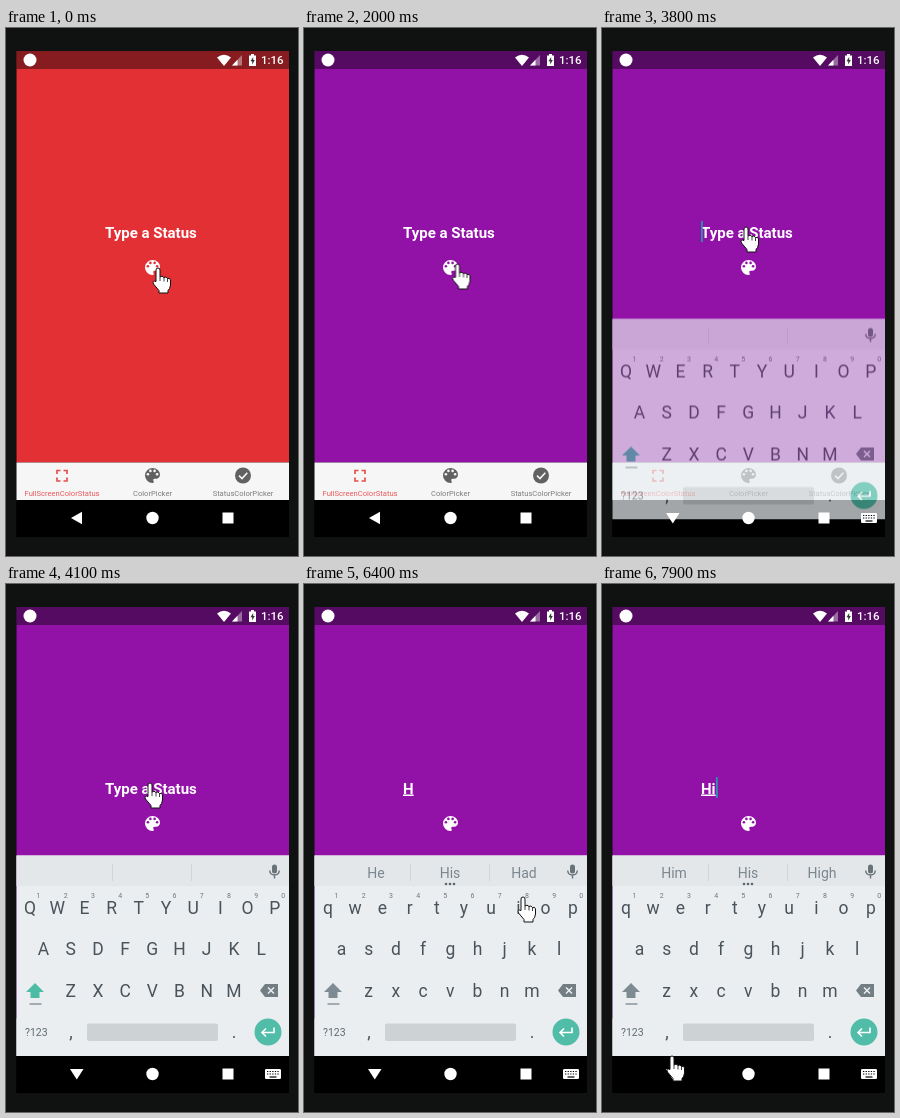
An HTML page for the animation above (8 s loop, 292x528 px).

```html
<!DOCTYPE html>
<html lang="en">
<head>
<meta charset="utf-8">
<title>Colour status</title>
<style>
  html, body { margin: 0; width: 100%; height: 100%; overflow: hidden; background: #101211; }
  svg { display: block; width: 292px; height: 528px; font-family: Roboto, sans-serif; }
  .mid { text-anchor: middle; }
  .status { font-size: 15px; font-weight: 700; fill: #fff; }
  .composing { text-decoration: underline; }
  .label { font-size: 7.6px; fill: #7d7d7d; }
  .key { font-size: 17.5px; fill: #4a535a; }
  .digit { font-size: 7px; fill: #6d777d; }
  .hint { font-size: 14px; fill: #7b868d; }

  .anim { animation: 8s step-end infinite; }
  #screen { animation-name: screen; }
  #cursor { animation-name: cursor; }
  #caret { animation-name: caret; }
  #keyboard { animation-name: keyboard; }
  .closed { animation-name: closed; }
  .open { animation-name: open; }
  .empty { animation-name: empty; }
  .typed { animation-name: typed; }
  .one { animation-name: one; }
  .two { animation-name: two; }
  .hints-one { animation-name: hints-one; }
  .hints-two { animation-name: hints-two; }
  .dots { animation-name: dots; }

  @keyframes screen {
    0% { fill: #e33035; } 12.5% { fill: #d80062; } 23.75%, 100% { fill: #9212a8; }
  }
  @keyframes keyboard {
    0% { opacity: 0; transform: translateY(30px); }
    46.25% { opacity: .35; transform: translateY(30px); }
    47.5% { opacity: .7; transform: translateY(19.5px); }
    48.75% { opacity: .92; transform: translateY(6px); }
    50%, 100% { opacity: 1; transform: none; }
  }
  @keyframes cursor {
    0% { transform: translate(152px, 240px); }
    1.25% { transform: translate(153.5px, 236px); }
    31.25% { transform: translate(148px, 233px); }
    32.5% { transform: translate(139px, 226px); }
    33.75% { transform: translate(133px, 216px); }
    35% { transform: translate(144px, 199px); }
    57.5% { transform: translate(145px, 208px); }
    58.75% { transform: translate(150px, 240px); }
    60% { transform: translate(160px, 290px); }
    61.25% { transform: translate(173px, 340px); }
    62.5% { transform: translate(179px, 358px); }
    77.5% { transform: translate(191px, 346px); }
    78.75% { transform: translate(209px, 325px); }
    80% { transform: translate(219px, 313px); }
    95% { transform: translate(207px, 335px); }
    96.25% { transform: translate(165px, 390px); }
    97.5% { transform: translate(110px, 443px); }
    98.75%, 100% { transform: translate(70px, 472px); }
  }
  @keyframes caret {
    0% { opacity: 0; transform: translateX(99px); }
    43.75%, 56.25% { opacity: 1; transform: translateX(99px); }
    50%, 62.5% { opacity: 0; transform: translateX(99px); }
    68.75%, 83.75% { opacity: 1; transform: translateX(110.5px); }
    77.5% { opacity: 0; transform: translateX(110.5px); }
    86.25%, 98.75%, 100% { opacity: 1; transform: translateX(114px); }
    92.5% { opacity: 0; transform: translateX(114px); }
  }
  @keyframes closed { 0% { opacity: 1; } 46.25%, 100% { opacity: 0; } }
  @keyframes open { 0% { opacity: 0; } 46.25%, 100% { opacity: 1; } }
  @keyframes empty { 0% { opacity: 1; } 68.75%, 100% { opacity: 0; } }
  @keyframes typed { 0% { opacity: 0; } 68.75%, 100% { opacity: 1; } }
  @keyframes one { 0% { opacity: 0; } 68.75% { opacity: 1; } 86.25%, 100% { opacity: 0; } }
  @keyframes two { 0% { opacity: 0; } 86.25%, 100% { opacity: 1; } }
  @keyframes hints-one { 0% { opacity: 0; } 70% { opacity: 1; } 87.5%, 100% { opacity: 0; } }
  @keyframes hints-two { 0% { opacity: 0; } 87.5%, 100% { opacity: 1; } }
  @keyframes dots { 0% { opacity: 0; } 70%, 100% { opacity: 1; } }
</style>
</head>
<body>
<svg viewBox="0 0 292 528">
  <defs>
    <mask id="holes" maskUnits="userSpaceOnUse" x="-9" y="-9" width="18" height="18">
      <rect x="-9" y="-9" width="18" height="18" fill="#fff"/>
      <circle cx="-4.6" cy="-1.2" r="1.3"/><circle cx="-2.1" cy="-4.6" r="1.3"/>
      <circle cx="2.1" cy="-4.6" r="1.3"/><circle cx="4.6" cy="-1.2" r="1.3"/>
    </mask>
    <path id="palette" mask="url(#holes)" d="M0-7.5A7.5 7.5 0 0 0 0 7.5C1.2 7.5 1.7 6.2 1 5.4C.2 4.3 1 3.3 2 3.3H3.5C6 3.3 7.5 1.4 7.5-.8C7.5-4.5 4.2-7.5 0-7.5Z"/>
    <path id="shift" d="M0-8L9 1H4.500V7H-4.500V1H-9Z"/>
  </defs>

  <rect width="292" height="528" fill="#101211"/>
  <path d="M10.500 509V23H283V509" fill="#000"/>
  <rect id="screen" class="anim" x="10.500" y="23" width="272.500" height="411.500"/>

  <!-- status bar -->
  <rect x="10.500" y="23" width="272.500" height="18" fill="#000" opacity=".41"/>
  <g fill="#fff">
    <circle cx="24" cy="32" r="6.500"/>
    <path d="M211 29.500Q218 24 225 29.500L218 38Z"/>
    <path d="M226 37.500L236 27V37.500Z" opacity=".4"/>
    <path d="M226 37.500L231.500 31.700V37.500Z"/>
    <path d="M243 27.500H245V26H248V27.500H250V38H243Z"/>
    <text x="255" y="36" font-size="11.500" font-weight="500">1:16</text>
  </g>
  <path d="M247.200 29L244.500 33.300H246.200V36.500L248.800 32H247.200Z" fill="#333"/>

  <!-- status input -->
  <text class="status anim empty" x="99" y="209.500">Type a Status</text>
  <text class="status composing anim one" x="99" y="209.500">H</text>
  <text class="status composing anim two" x="99" y="209.500">Hi</text>
  <rect id="caret" class="anim" y="193" width="1.800" height="21" fill="#2b8fae"/>
  <use href="#palette" x="146.500" y="239.500" fill="#fff"/>

  <!-- tabs -->
  <rect x="10.500" y="434.500" width="272.500" height="37.500" fill="#f6f6f6"/>
  <path d="M51 446V442.500H54.500M57.500 442.500H61V446M61 449.500V453H57.500M54.500 453H51V449.500" fill="none" stroke="#e5504f" stroke-width="1.700"/>
  <use href="#palette" x="146.500" y="447.500" fill="#616161"/>
  <circle cx="237" cy="447.500" r="8" fill="#616161"/>
  <path d="M233 447.700L236 450.500L241.300 444.700" fill="none" stroke="#f6f6f6" stroke-width="1.600"/>
  <g class="mid">
    <text class="label" x="56" y="468" style="fill:#e9575a">FullScreenColorStatus</text>
    <text class="label" x="146.500" y="468">ColorPicker</text>
    <text class="label" x="237" y="468">StatusColorPicker</text>
  </g>
  <rect x="10.500" y="472" width="272.500" height="37" fill="#000"/>

  <g id="keyboard" class="anim">
    <rect x="10.500" y="271.500" width="272.500" height="200.500" fill="#eaeef1"/>
    <rect x="10.500" y="271.500" width="272.500" height="30.500" fill="#e3e7ea"/>
    <path d="M106.500 280V297M185.500 280V297" stroke="#d0d5d9"/>
    <g fill="none" stroke="#69747a" stroke-width="1.400">
      <rect x="266.700" y="281.200" width="3.600" height="7.600" rx="1.800" fill="#69747a"/>
      <path d="M263.700 286.500Q264 291 268.500 291T273.300 286.500M268.500 291V294.500"/>
    </g>
    <g class="hint mid">
      <g class="anim hints-one" id="hintsOne"></g>
      <g class="anim hints-two" id="hintsTwo"></g>
    </g>
    <g class="anim dots" fill="#5c666c">
      <circle cx="142" cy="300" r="1.300"/><circle cx="146" cy="300" r="1.300"/><circle cx="150" cy="300" r="1.300"/>
    </g>

    <g id="digits" class="digit mid"></g>
    <g id="upper" class="key mid anim empty"></g>
    <g id="lower" class="key mid anim typed"></g>

    <use href="#shift" x="29" y="407" class="anim empty" fill="#4dbca5"/>
    <use href="#shift" x="29" y="407" class="anim typed" fill="#7f8b93"/>
    <path d="M23.500 420H35.500" stroke="#8b969c" stroke-width="1.500"/>
    <path d="M254 406.500L259 400H272V413H259Z" fill="#737e84"/>
    <path d="M262 403.500L268 409.500M268 403.500L262 409.500" stroke="#eaeef1" stroke-width="1.500"/>

    <text x="19" y="452" font-size="10.500" fill="#5f6a70">?123</text>
    <text class="key mid" x="65" y="454">,</text>
    <rect x="81" y="439.500" width="131" height="17.500" rx="2" fill="#cdd2d5"/>
    <text class="key mid" x="228" y="454">.</text>
    <circle cx="262" cy="448" r="13.500" fill="#51bda8"/>
    <path d="M268 443.500V448.500H256.500M260 444.500L256 448.500L260 452.500" fill="none" stroke="#fff" stroke-width="1.600"/>
  </g>

  <!-- navigation -->
  <g fill="#fff">
    <path class="anim closed" d="M65 490L76 483.800V496.200Z"/>
    <path class="anim open" d="M64 485H77.500L70.800 495.500Z"/>
    <circle cx="146.500" cy="490" r="6.200"/>
    <rect x="216.500" y="484.500" width="11" height="11"/>
    <g class="anim open">
      <rect x="259" y="485" width="16" height="10" rx="1.200"/>
      <path d="M261 487.500H273M261 490H273" stroke="#000" stroke-width="1.200" stroke-dasharray="1.300 1.300"/>
      <path d="M263.500 493H270.500" stroke="#000" stroke-width="1.200"/>
    </g>
  </g>

  <g id="cursor" class="anim" stroke="#111" stroke-linejoin="round">
    <path d="M-2 2Q-2 0 0 0T2 2V9Q4 7 6 9.500Q8 8 9.500 10.500Q12 9.500 12.500 12V17Q12 21 10 22.500V25H1V22.500L-4.500 16Q-6 12-2 13.500Z" fill="#fff"/>
    <path d="M2 9V13M6 9.500V13.500M9.500 10.500V14" fill="none" stroke-width=".8"/>
  </g>
</svg>
<script>
  const STEP = 27.2;
  const rows = [["qwertyuiop", 24, 329.5], ["asdfghjkl", 37.5, 371], ["zxcvbnm", 64.7, 413]];
  const byId = id => document.getElementById(id);

  function addText(parent, content, x, y) {
    const node = document.createElementNS("http://www.w3.org/2000/svg", "text");
    node.setAttribute("x", x);
    node.setAttribute("y", y);
    node.textContent = content;
    parent.append(node);
  }

  for (const [letters, left, y] of rows) {
    [...letters].forEach((letter, i) => {
      const x = left + i * STEP;
      addText(byId("upper"), letter.toUpperCase(), x, y);
      addText(byId("lower"), letter, x, y);
    });
  }
  [..."1234567890"].forEach((digit, i) => addText(byId("digits"), digit, 32.5 + i * STEP, 314));

  const addHints = (id, words) =>
    words.forEach((word, i) => addText(byId(id), word, 72 + i * 74, 293.5));
  addHints("hintsOne", ["He", "His", "Had"]);
  addHints("hintsTwo", ["Him", "His", "High"]);
</script>
</body>
</html>
```
